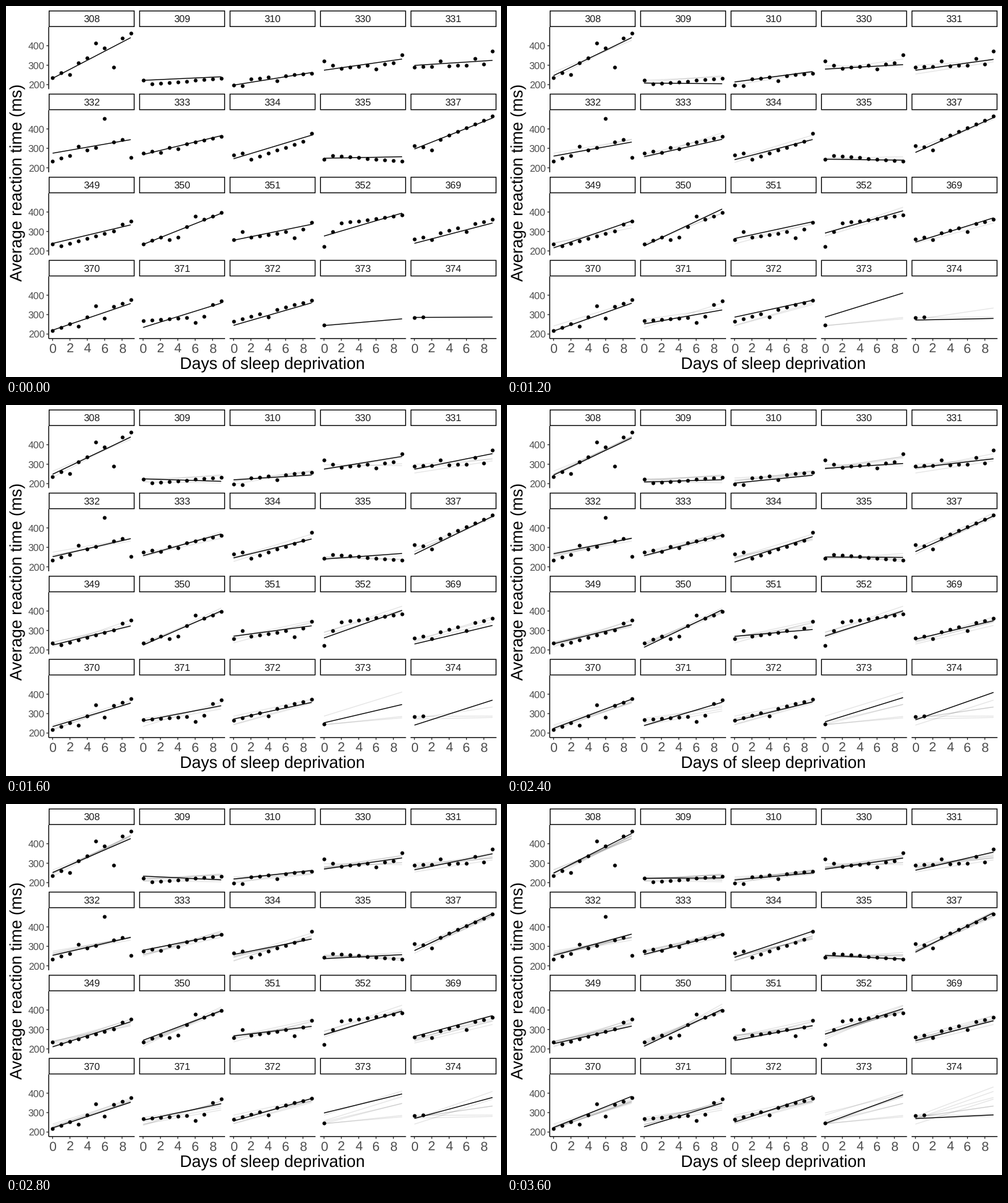
Animation of 800x600 px, one loop 4 s. Source, as a matplotlib script:

```python
import numpy as np
import matplotlib.pyplot as plt
from matplotlib.animation import FuncAnimation
from matplotlib.collections import LineCollection
from matplotlib.patches import Rectangle

W, H, DPI = 800, 600, 100
PX = 72 / DPI                            # points per pixel
THIN = 1.42 * PX

# Panel grid, in pixels
LEFT, RIGHT, TOP, GAP = 69.0, 792.67, 7.33, 7.33
STRIP, TALL = 26.6, 100.52
WIDE = (RIGHT - LEFT - 4 * GAP) / 5
COL, ROW = WIDE + GAP, STRIP + TALL + GAP
BASE = TOP + 3 * ROW + STRIP + TALL      # bottom axis
DAY = WIDE / 9.9                         # pixels per day
Y200, MS = 127.2, 0.3145                 # y of 200 ms, pixels per ms

# Partial pooling of intercept and slope across subjects
DRAWS, NOISE = 9, 25
POP = np.array([251.4, 10.5])
PRIOR = np.diag([24.0, 6.0]) ** -2.0 if False else np.diag([1 / 24**2, 1 / 6**2])

rng = np.random.default_rng(308)

plt.rcParams.update({
    "font.family": "Liberation Sans",
    "text.hinting": "none",
    "path.snap": False,
})

fig = plt.figure(figsize=(W / DPI, H / DPI), dpi=DPI, facecolor="white")
ax = fig.add_axes([0, 0, 1, 1])
ax.set_xlim(0, W)
ax.set_ylim(H, 0)
ax.axis("off")

panels = []                              # fitted segments of each panel


def label(x, y, text, size, color, ha="center", **kw):
    ax.text(x, y, text, fontsize=size * PX, color=color, ha=ha,
            va="baseline", **kw)


def stroke(xs, ys, color="black"):
    ax.plot(xs, ys, color=color, lw=THIN, solid_capstyle="butt", zorder=2)


def to_xy(col, row, days, ms):
    x = LEFT + col * COL + (np.asarray(days) + 0.45) * DAY
    y = Y200 + row * ROW - (np.asarray(ms) - 200) * MS
    return x, y


def fit_draws(days, times):
    """Random (intercept, slope) pairs from the posterior of one subject."""
    X = np.column_stack([np.ones(len(days)), days])
    cov = np.linalg.inv(X.T @ X / NOISE**2 + PRIOR)
    mean = cov @ (X.T @ times / NOISE**2 + PRIOR @ POP)
    return rng.multivariate_normal(mean, cov, DRAWS)


def panel(name, first, last, odd={}, count=10):
    """One subject: a straight trend, except on a few odd days."""
    row, col = divmod(len(panels), 5)
    left, top = LEFT + col * COL, TOP + row * ROW
    ax.add_patch(Rectangle((left + 0.7, top + 0.7), WIDE - 1.4, STRIP - 1.4,
                           fc="white", ec="black", lw=THIN, zorder=3))
    label(left + WIDE / 2, top + 19, str(name), 16, "#1a1a1a", zorder=4)

    days = np.arange(count)
    times = np.linspace(first, last, count)
    for day, ms in odd.items():
        times[day] = ms
    ax.plot(*to_xy(col, row, days, times), "o", color="black",
            ms=6.15 * PX, mew=0, zorder=6)
    panels.append([np.column_stack(to_xy(col, row, [0, 9], [a, a + 9 * b]))
                   for a, b in fit_draws(days, times)])


panel(308, 235, 465, {2: 251, 5: 415, 7: 290})
panel(309, 199, 233, {0: 223})
panel(310, 222, 258, {0: 199, 1: 194, 5: 220})
panel(330, 276, 316, {0: 322, 1: 300, 6: 280, 9: 354})
panel(331, 290, 306, {3: 320, 7: 335, 9: 372})
panel(332, 235, 360, {3: 310, 6: 454, 9: 254})
panel(333, 276, 362, {2: 277, 4: 297})
panel(334, 213, 351, {0: 265, 1: 276, 9: 377})
panel(335, 267, 233, {0: 242})
panel(337, 287, 465, {0: 312, 2: 292})
panel(349, 215, 325, {0: 236, 8: 336, 9: 352})
panel(350, 235, 398, {3: 256, 4: 269, 6: 379})
panel(351, 256, 318, {1: 300, 7: 267, 9: 348})
panel(352, 330, 385, {0: 222, 1: 298})
panel(369, 260, 362, {2: 258, 6: 298})
panel(370, 217, 376, {3: 240, 5: 344, 6: 281})
panel(371, 268, 298, {6: 259, 8: 351, 9: 369})
panel(372, 266, 374, {4: 287})
panel(373, 245, 245, count=1)
panel(374, 285, 288, count=2)

# y axes on the first column
for row in range(4):
    top = TOP + row * ROW + STRIP
    stroke([LEFT, LEFT], [top, top + TALL])
    for ms in (200, 300, 400):
        _, y = to_xy(0, row, 0, ms)
        stroke([LEFT - 3.67, LEFT], [y, y], "#333333")
        label(LEFT - 6.4, y + 5.7, str(ms), 16, "#4d4d4d", ha="right")

# x axes under the last row
for col in range(5):
    left = LEFT + col * COL
    stroke([left, left + WIDE], [BASE, BASE])
    for day in range(0, 10, 2):
        x, _ = to_xy(col, 3, day, 200)
        stroke([x, x], [BASE, BASE + 3.67], "#333333")
        label(x, 560.3, str(day), 21.33, "#4d4d4d")

label((LEFT + RIGHT) / 2, 587.6, "Days of sleep deprivation", 26.67, "black")
label(26.2, (TOP + STRIP + BASE) / 2, "Average reaction time (ms)", 26.67,
      "black", rotation=90, rotation_mode="anchor")

past = LineCollection([], colors="black", alpha=0.1, linewidths=THIN,
                      capstyle="butt", zorder=4)
now = LineCollection([], colors="black", linewidths=THIN,
                     capstyle="butt", zorder=5)
ax.add_collection(past, autolim=False)
ax.add_collection(now, autolim=False)


def draw(i):
    """Show one draw in black over the faint trail of earlier ones."""
    k = max(0, i - 1)                    # the first draw holds two steps
    past.set_segments([seg for fits in panels for seg in fits[:k]])
    now.set_segments([fits[k] for fits in panels])
    return past, now


anim = FuncAnimation(fig, draw, frames=DRAWS + 1, interval=400,
                     init_func=lambda: draw(0), repeat=True, repeat_delay=0)
plt.show()
```
